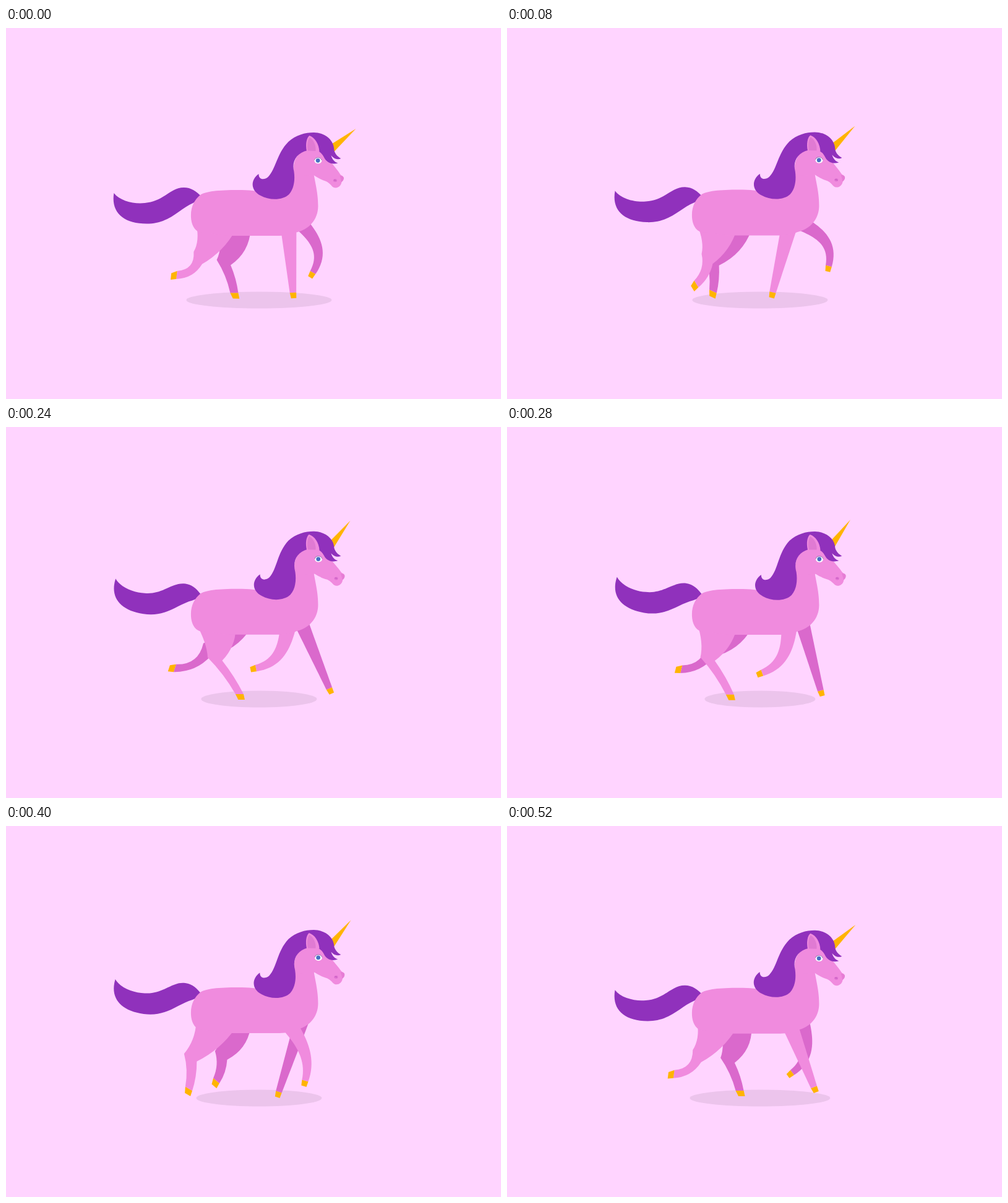
An HTML page for the animation above (0.56 s loop, 800x600 px).

```html
<!DOCTYPE html>
<html lang="en">
<head>
<meta charset="utf-8">
<title>Trotting unicorn</title>
<style>
  html, body { margin: 0; width: 100%; height: 100%; overflow: hidden; background: #ffd4ff; }
  svg { display: block; width: 100vw; height: 100vh; }
  .coat { fill: #f08bde; }
  .shade { fill: #da69cc; }
  .hair { fill: #9031bc; }
  .gold { fill: #ffb400; }
</style>
</head>
<body>
<svg viewBox="0 0 800 600">
  <g transform="translate(-0.6 0)">
    <ellipse id="shadow" cx="409.5" cy="440" ry="13.5" fill="#ecc4ec"/>
    <path id="tail" class="hair" d="M175 267C185 280 208 285 225 283C255 281 266 258 288 258C300 258 308 264 318 274L303 283C280 293 265 316.500 228 316.500C190 316.500 170 298 175 267Z"/>
    <g id="farLegs" class="shade"></g>
    <g id="nearLegs" class="coat"></g>
    <path id="body" class="coat" d="M314 270.500C322 264 345 262 375 262C395 262 405 263 415 266L450 262L466 228L498 236C501 254 505 268 505 288C505 310 490 326 470 330.500C460 335 450 336 438 336L362 336C345 336 335 331 318 331C309 331 299.500 322 299.500 303C299.500 288 306 277 314 270.500Z"/>
    <path id="horn" class="gold"/>
    <g id="head">
      <path class="coat" d="M490 196C507 193 516 204 522 212L537 231C540 235 541 238 544 239C547.500 241 546.500 246 543 249C542 257.500 533 261 528 256.500C524 252 522 250 518 248C510 245.500 504 242 498 238L466 240C462 215 472 199 490 196Z"/>
      <path fill="#e67dd5" d="M540 238.500C542 239.500 547 239 546.500 243.500C546 247 544 248 542.500 249.500C542 245 541 242 540 238.500Z"/>
      <ellipse cx="532.500" cy="246.500" rx="3" ry="2.500" fill="#df74d2"/>
      <path d="M530.500 246.500Q533 244.500 534 247.500" fill="none" stroke="#c65bc0" stroke-width="1"/>
      <ellipse cx="505" cy="214.500" rx="6" ry="4.800" fill="#fff"/>
      <path d="M499 213.500C501 208 509 208 511 214" fill="none" stroke="#a07ab5" stroke-width="1"/>
      <circle cx="504.700" cy="214.300" r="3.400" fill="#4870c4"/>
    </g>
    <path id="mane" class="hair"/>
    <g id="ear">
      <path class="coat" d="M486.500 199C484.500 188 486 178 491 174C500 177 506.500 188 507 200Z"/>
      <path fill="#e07ad3" d="M488.500 198.500C486.500 190 488 181 491.500 177C498 181 502 190 501 199Z"/>
    </g>
  </g>
</svg>
<script>
const LOOP = 560, STEP = 40;
const $ = id => document.getElementById(id);
const set = (id, name, value) => $(id).setAttribute(name, value);
const fix = v => +v.toFixed(2);
const clamp = v => Math.max(0, Math.min(1, v));
const mix = (a, b, k) => a + (b - a) * k;
const lerp = (p, q, k) => p.map((v, i) => mix(v, q[i], k));
const add = (p, x, y) => [p[0] + x, p[1] + y];
const str = p => p.map(fix).join(' ');
const poly = pts => 'M' + pts.map(str).join('L') + 'Z';

// Each leg is led by the closed track of its ankle; joints and outlines follow from it
const hindNear = {
  root: [308, 318], front: [372, 326], kneeX: 463, kneeY: 372, lift: 0.1, lead: 25, bulge: 11,
  track: [[276.5, 399.5], [306.5, 414], [373, 427.5], [378, 432], [338, 432], [296, 425], [271, 407]]
};
const hindFar = {
  root: [345, 325], front: [396, 326], kneeX: 473.5, kneeY: 365, lift: 0.5, lead: 0, bulge: 16,
  track: [[369.5, 428.5], [333.5, 426], [295.5, 408], [273.5, 390], [299, 397.5], [340.5, 412], [375, 425.5]]
};
const foreNear = {
  root: [457, 320], reach: 108, wide: 26, thin: 10.5,
  track: [[464.5, 428], [430, 427.5], [403, 403], [404.5, 390], [428, 407.5], [484, 412], [520, 416]]
};
const foreFar = {
  root: [478, 317], reach: 104, wide: 23, thin: 10,
  track: [[496.5, 395.5], [520.5, 385], [543, 397.5], [523, 423], [488.5, 427], [441.5, 430], [431, 404]]
};

// Smooth closed curve through evenly timed points
function follow(track, t) {
  const n = track.length, pos = t / LOOP * n, i = Math.floor(pos), u = pos - i;
  const [a, b, c, d] = [-1, 0, 1, 2].map(k => track[(i + k + n) % n]);
  return b.map((p, k) => p + u / 2 * (c[k] - a[k] +
    u * (2 * a[k] - 5 * p + 4 * c[k] - d[k] + u * (3 * (p - c[k]) + d[k] - a[k]))));
}

// Control point beside the middle of p-q, on the right when heading down
function bow(p, q, size) {
  const dx = q[0] - p[0], dy = q[1] - p[1], k = size / Math.hypot(dx, dy);
  return add(lerp(p, q, 0.5), dy * k, -dx * k);
}

// Two points around a centre, apart along the given angle
function pair(c, half, angle) {
  const x = half * Math.cos(angle), y = half * Math.sin(angle);
  return [add(c, -x, -y), add(c, x, y)];
}

// Hoof below the ankle line a-b; sa and sb slide its lower corners along that line
function hoofPath(a, b, sa, sb) {
  const len = Math.hypot(b[0] - a[0], b[1] - a[1]);
  const ux = (b[0] - a[0]) / len, uy = (b[1] - a[1]) / len;
  const low = (p, s) => add(p, ux * s - uy * 9, uy * s + ux * 9);
  return poly([a, b, low(b, sb), low(a, sa)]);
}

// The hock moves with the hoof, and the ankle folds as the shank swings back
function hindLeg(leg, t) {
  const ankle = follow(leg.track, t), ahead = follow(leg.track, t + leg.lead);
  const knee = [leg.kneeX + 0.6 * ahead[0] - 0.8 * ahead[1], leg.kneeY + leg.lift * (ankle[1] - 400)];
  const swing = Math.atan2(knee[0] - ankle[0], ankle[1] - knee[1]);
  const [hock, shin] = pair(knee, 12, 0.52 + swing / 2);
  const [a, b] = pair(ankle, 6.5, Math.max(0, 0.47 + 1.35 * swing));
  const curl = 5 + 17 * Math.max(0, swing);
  const thigh = add(lerp(leg.root, hock, 0.5), 8, 4);
  return [
    `M${leg.root}Q${str(thigh)} ${str(hock)}Q${str(bow(hock, a, curl))} ${str(a)}L${str(b)}` +
    `Q${str(bow(shin, b, curl * 0.65))} ${str(shin)}Q${str(bow(leg.front, shin, leg.bulge))} ${leg.front}Z`,
    hoofPath(a, b, 4.5, 2)
  ];
}

// A tapering limb that bows forward when the hoof comes closer than its reach
function foreLeg(leg, t) {
  const N = 20, end = follow(leg.track, t), [x0, y0] = leg.root;
  const dx = end[0] - x0, dy = end[1] - y0, dist = Math.hypot(dx, dy);
  const bend = 0.24 * Math.sqrt(Math.max(0, leg.reach ** 2 - dist ** 2)) / dist;
  const ctrl = (k, f) => [x0 + dx * k + dy * bend * f, y0 + dy * k - dx * bend * f];
  const pts = [leg.root, ctrl(1 / 3, 1), ctrl(2 / 3, 1.7), end];
  const left = [], right = [];
  for (let i = 0; i <= N; i++) {
    const u = i / N;
    const [a, b, c] = [0, 1, 2].map(j => lerp(pts[j], pts[j + 1], u));
    const p = lerp(a, b, u), q = lerp(b, c, u), mid = lerp(p, q, u);
    const [l, r] = pair(mid, mix(leg.wide, leg.thin, u) / 2, Math.atan2(p[0] - q[0], q[1] - p[1]));
    left.push(l);
    right.push(r);
  }
  return [poly([...left, ...right.slice().reverse()]), hoofPath(left[N], right[N], 1.5, -0.5)];
}

function addLeg(group, shape, leg) {
  const parts = ['', 'gold'].map(name => {
    const el = document.createElementNS('http://www.w3.org/2000/svg', 'path');
    if (name) el.setAttribute('class', name);
    return $(group).appendChild(el);
  });
  return t => shape(leg, t).forEach((d, i) => parts[i].setAttribute('d', d));
}

const legs = [
  addLeg('farLegs', hindLeg, hindFar),
  addLeg('farLegs', foreLeg, foreFar),
  addLeg('nearLegs', hindLeg, hindNear),
  addLeg('nearLegs', foreLeg, foreNear)
];

const maneShape = 'M409 236C409 246 418 246 424 241C437 228 438 203 457 184C469 173 484 169 498 169' +
  'C516 169 531 181 531 198C533 205 538 209 542 211C536 214 530 211 526 206C528 213 532 217 537 218.5' +
  'C526 222 518 216 515 210C512 204 508 199 500 197L488 198C470 202 462 216 466 232C468 246 466 260 458 269' +
  'C448 279 426 279 412 271C396 263 395 246 409 236Z';

// The lower mane swings forward while the forelock lifts with the head
function manePath(sway, bob) {
  return maneShape.replace(/([\d.]+) ([\d.]+)/g, (_, a, b) => {
    const x = +a, y = +b;
    const hang = x < 480 ? clamp((y - 190) / 45) : 0;
    const lift = y > 190 ? clamp((x - 500) / 35) : 0;
    return str([x + 2.5 * sway * hang, y + sway * (3 * hang - 2.6 * lift) + bob]);
  });
}

function hornPath(q) {
  const tip = [566 - 12 * q, 163 - 20 * q + 6 * q * q];
  return poly([tip, [mix(529, 525, q), 202], [mix(523, 517.5, q), 190]]);
}

function draw(t) {
  const q = t < 320 ? t / 320 : (LOOP - t) / 240;
  const sway = (1 - Math.cos(Math.PI * q)) / 2;
  const bob = (Math.cos(4 * Math.PI * t / LOOP) - 1) / 2;
  const tilt = `translate(0 ${fix(bob)}) rotate(${fix(-2.2 * sway)} 490 195)`;
  set('shadow', 'rx', 89.5 + 28 * Math.abs(1 - t / 280));
  set('tail', 'transform', `rotate(${fix(10.3 * sway)} 318 274)`);
  set('body', 'transform', `translate(0 ${fix(bob)})`);
  set('mane', 'd', manePath(sway, bob));
  set('horn', 'd', hornPath(q));
  set('head', 'transform', tilt);
  set('ear', 'transform', tilt);
  legs.forEach(leg => leg(t));
}

const start = performance.now();
function tick() {
  const t = (performance.now() - start) % LOOP;
  draw(Math.floor(t / STEP) * STEP);
  requestAnimationFrame(tick);
}
tick();
</script>
</body>
</html>
```
